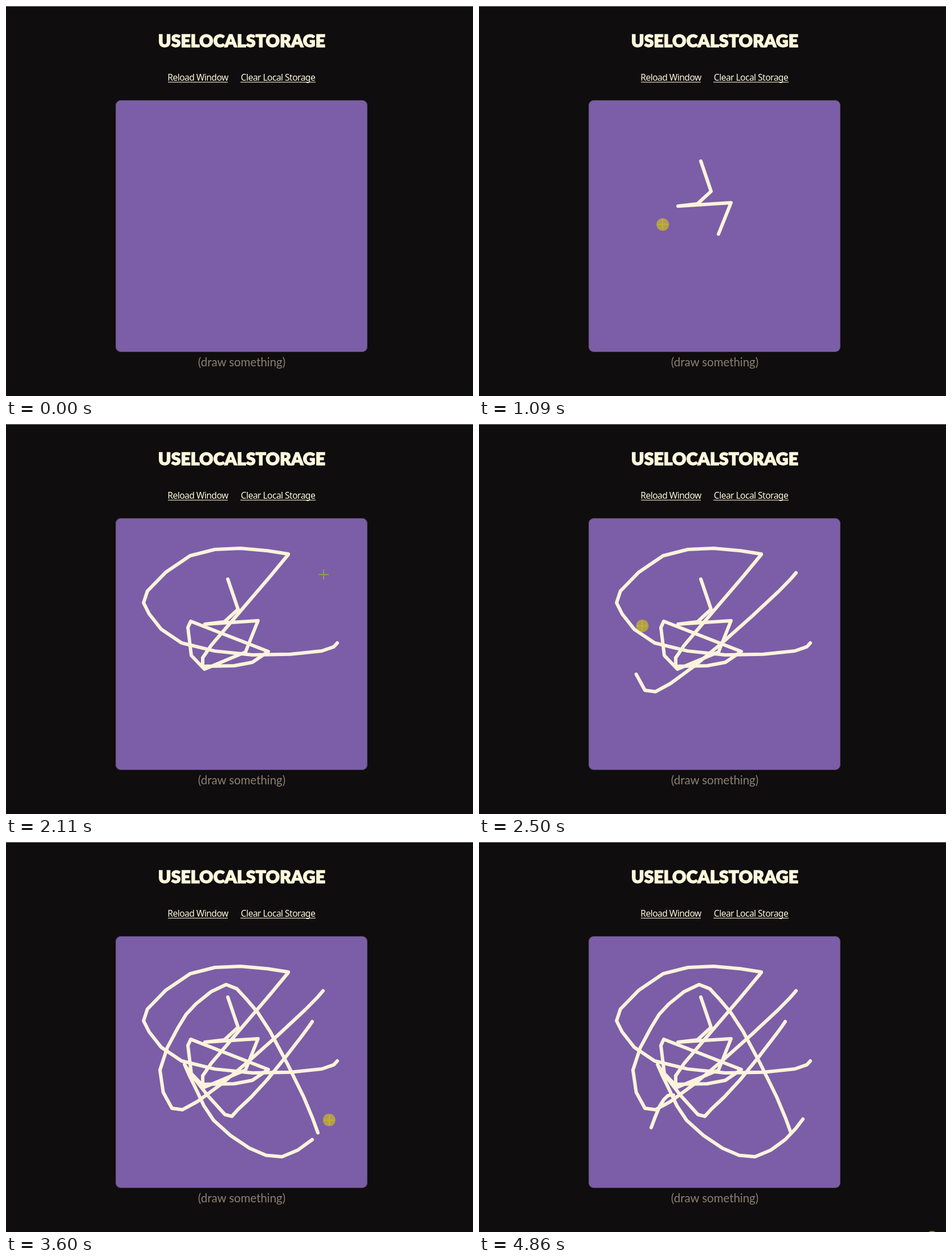
Write an HTML page with a canvas that moves like this. It is 819 by 684 pixels and loops after 4990 ms.

```html
<!DOCTYPE html>
<html lang="en">
<head>
<meta charset="utf-8">
<title>useLocalStorage</title>
<style>
html, body { margin: 0; width: 100%; height: 100%; overflow: hidden; background: #0f0d0e; }
svg, canvas { position: absolute; left: 0; top: 0; width: 819px; height: 684px; }
text { fill: #fff8dc; text-anchor: middle; }
.title { font: 900 30px Lato, sans-serif; letter-spacing: .15px; stroke: #fff8dc; stroke-width: 1.4px; }
.link { font: 15.6px "Noto Sans", "Open Sans", sans-serif; letter-spacing: -.55px; }
.hint { font: 20.4px Lato, sans-serif; fill: #8c8072; }
</style>
</head>
<body>
<svg viewBox="0 0 819 684">
  <rect width="819" height="1" fill="#8c8b8b"/>
  <text class="title" x="413.5" y="72">USELOCALSTORAGE</text>
  <text class="link" x="336.5" y="131">Reload Window</text>
  <text class="link" x="477" y="131">Clear Local Storage</text>
  <path d="M284 133.5H389M411 133.5H543" stroke="#fff8dc"/>
  <text class="hint" x="413.5" y="632">(draw something)</text>
</svg>
<canvas width="819" height="684"></canvas>
<script>
const LOOP = 4990;
const STEP = 64; // the screen updates in steps
const LAG = 60;  // ink trails the pointer
const CLICK = 4860;
const ctx = document.querySelector('canvas').getContext('2d');

const linear = p => p;
const smooth = p => p * p * (3 - 2 * p);
const glide = p => 1 - (1 - p) ** 5;
const mix = (a, b, f) => [a[0] + (b[0] - a[0]) * f, a[1] + (b[1] - a[1]) * f];
const dist = (a, b) => Math.hypot(b[0] - a[0], b[1] - a[1]);

// Spline through the points, as two chords per span
function curve(...pts) {
  const out = [];
  pts.forEach((p, i) => {
    out.push(p);
    const q = pts[i + 1];
    if (!q) return;
    const before = pts[i - 1] || p, after = pts[i + 2] || q;
    out.push([0, 1].map(k => (9 * (p[k] + q[k]) - before[k] - after[k]) / 16));
  });
  return out;
}

// A stroke drawn from one time to another; a single point is a place to hover
function stroke(from, to, pts, ease = linear) {
  let sum = 0;
  const at = pts.map((p, i) => sum += i ? dist(pts[i - 1], p) : 0);
  const reach = t => sum * ease(Math.min(1, Math.max(0, (t - from) / (to - from))));
  return { from, to, pts, at, reach };
}
const hover = (t, x, y) => stroke(t, t, [[x, y]]);

const path = [
  hover(60, 786, 659),
  hover(620, 351, 269),
  stroke(690, 1400, [[389,272], [407,325], [383,347], [349,351], [442,345], [420,400], [348,430],
    [325,406], [319,357], [324,346], [460,399], [432,418], [400,424], [345,425], [345,410]]),
  stroke(1400, 1560, [[345,410], [360,388], [407,333], [461,270], [495,229]]),
  stroke(1560, 2040, curve([495,228], [411,218], [323,231], [248,293], [251,333], [308,384],
    [432,405], [554,398], [581,384])),
  stroke(2180, 2810, curve([556,261], [525,294], [425,385], [336,455], [291,467], [270,400],
    [302,325], [333,284], [386,250], [422,276], [463,332], [522,447], [547,510])),
  stroke(3080, 3600, curve([537,315], [519,340], [458,417], [407,469], [384,478], [325,408],
    [313,390], [335,437], [364,488], [427,537], [484,552], [537,522], [568,486]), smooth),
  stroke(3850, 4050, curve([341,444], [331,445], [317,463], [302,501])),
  hover(4280, 761, 601)
];

function along({ pts, at, reach }, t) {
  const d = reach(t), i = at.findIndex(a => a >= d);
  return i < 1 ? pts[0] : mix(pts[i - 1], pts[i], (d - at[i - 1]) / (at[i] - at[i - 1]));
}

function pointer(t) {
  if (t >= CLICK) return { pos: [794.5, 693], down: true };
  const i = path.findIndex(s => t <= s.to);
  if (i < 0 || t < path[0].from) return null;
  const s = path[i];
  if (t >= s.from) return { pos: along(s, t), down: s.pts.length > 1 };
  const last = path[i - 1];
  const p = (t - last.to) / (s.from - last.to);
  return { pos: mix(last.pts[last.pts.length - 1], s.pts[0], glide(p)), down: false };
}

function drawPanel() {
  ctx.beginPath();
  ctx.roundRect(192.5, 165.5, 441, 441, 8.5);
  ctx.fillStyle = '#7b5ea7';
  ctx.fill();
  ctx.lineWidth = 1;
  ctx.strokeStyle = '#4a4058';
  ctx.stroke();
}

function drawInk({ from, pts, at, reach }, t) {
  if (pts.length < 2 || t < from) return;
  const d = reach(t) + .01;
  ctx.beginPath();
  ctx.moveTo(...pts[0]);
  pts.forEach((p, i) => { if (at[i] <= d) ctx.lineTo(...p); });
  ctx.stroke();
}

// The crosshair inverts what is under it
function drawCross(x, y) {
  ctx.globalCompositeOperation = 'difference';
  ctx.fillStyle = '#fff';
  ctx.fillRect(x - 9, y - 1, 18, 2);
  ctx.fillRect(x - 1, y - 9, 2, 8);
  ctx.fillRect(x - 1, y + 1, 2, 8);
  ctx.globalCompositeOperation = 'source-over';
}

const arrow = new Path2D('M0 0V16L4 12.5L6.5 18L9 17L6.5 11.5H11.5Z');
function drawArrow(x, y) {
  ctx.save();
  ctx.translate(x + .5, y + .5);
  ctx.fillStyle = '#fff';
  ctx.strokeStyle = '#000';
  ctx.lineWidth = 1;
  ctx.stroke(arrow);
  ctx.fill(arrow);
  ctx.restore();
}

function drawPointer({ pos, down }) {
  const [x, y] = pos.map(Math.round);
  const inside = x > 193 && x < 633 && y > 166 && y < 606;
  (inside ? drawCross : drawArrow)(x, y);
  if (!down) return;
  ctx.fillStyle = 'rgba(220, 200, 20, .6)';
  ctx.beginPath();
  ctx.arc(...pos, 11, 0, Math.PI * 2);
  ctx.fill();
}

function draw(t) {
  ctx.clearRect(0, 0, 819, 684);
  drawPanel();
  ctx.strokeStyle = '#fdf3dc';
  ctx.lineWidth = 6;
  ctx.lineCap = ctx.lineJoin = 'round';
  path.forEach(s => drawInk(s, t - LAG));
  const p = pointer(t);
  if (p) drawPointer(p);
}

const t0 = performance.now();
function frame() {
  const now = (performance.now() - t0) % LOOP;
  draw(Math.floor((now + 10) / STEP) * STEP);
  requestAnimationFrame(frame);
}
frame();
</script>
</body>
</html>
```
